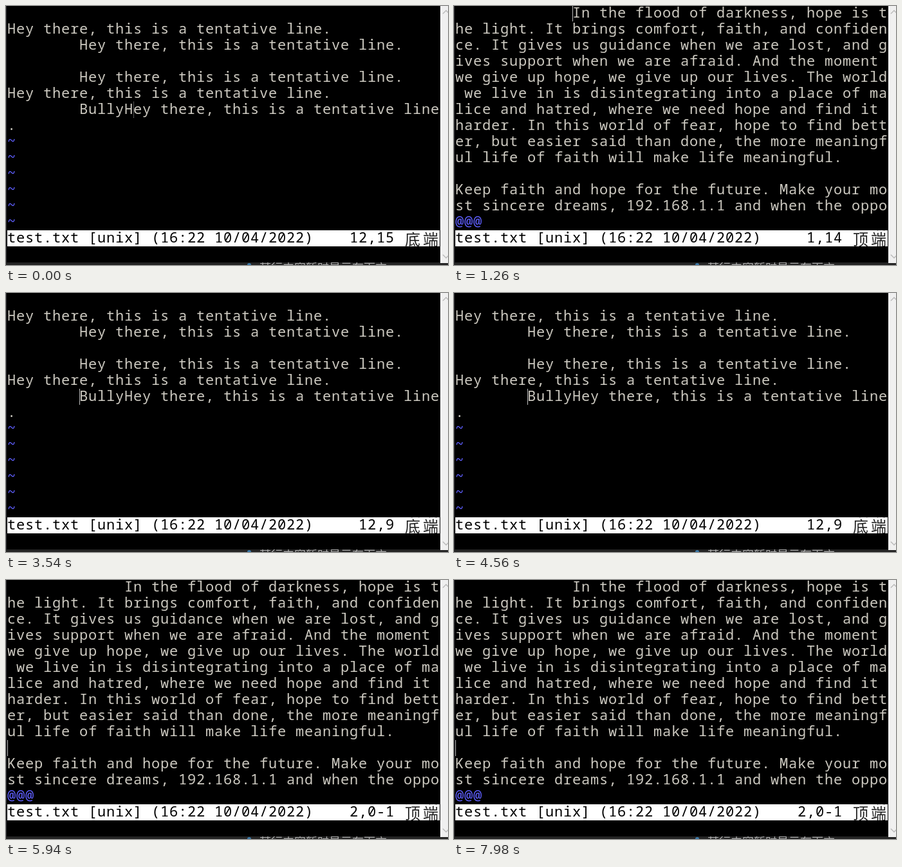
Recreate the animation shown at these times as an HTML page. Size 687 px wide and 403 px high, loop 8 s.

```html
<!DOCTYPE html>
<html lang="en">
<head>
<meta charset="utf-8">
<title>Terminal editor</title>
<style>
  html, body { margin: 0; width: 100%; height: 100%; overflow: hidden; background: #000; }
  #stage { position: relative; width: 687px; height: 403px; overflow: hidden; background: #000; }
  #stage div, #stage svg, .cjk { position: absolute; }
  #stage div { animation: 8s step-end infinite; }

  pre, .row {
    margin: 0; white-space: pre; color: #ccc9c0;
    font: 500 22px/25px "Noto Sans Mono", "DejaVu Sans Mono", monospace;
    letter-spacing: .8px;
  }
  b { font-weight: 500; color: #5f5fff; }
  #stage .page { left: 2px; top: -3px; }
  #stage .list { animation-name: list; }
  #stage .prose { animation-name: prose; }

  .status { left: 2px; top: 349px; width: 672px; height: 25px; overflow: hidden; background: #fff; }
  .status .row { color: #000; left: 0; top: -2px; }
  #stage .spots { left: 0; top: 0; width: 672px; animation-name: spots; }
  .spots pre { position: relative; top: -2px; height: 25px; }
  .cjk { left: 618px; top: 2px; color: #222; font: 300 24px/25px "Noto Sans CJK SC", "Noto Sans CJK", sans-serif; letter-spacing: 4px; }

  .key { left: 520px; top: 372px; }
  #stage .g { animation-name: g; }
  #stage .two { animation-name: two; }

  #stage .cursor { width: 1px; height: 25px; background: #bfbfbf; animation-name: blink; }

  .edge { left: 0; top: 0; width: 1px; height: 403px; background: #2c2c30; }
  .below { left: 0; top: 399px; width: 687px; height: 4px; overflow: hidden; background: #242424; }
  .below span { position: absolute; left: 394px; top: -2px; white-space: nowrap; color: #aaa;
    font: 18px/18px "Noto Sans CJK SC", "Noto Sans CJK", sans-serif; }
  .dot { left: 375px; top: 1px; width: 6px; height: 6px; border-radius: 50%; background: #3a78a8; }
  .bar { left: 675px; top: 0; width: 12px; height: 400px; background: #f0f0f0; }

  @keyframes list {
    0%, 44.25% { opacity: 1 }
    15.75%, 74.25%, 100% { opacity: 0 }
  }
  @keyframes prose {
    0%, 44.25% { opacity: 0 }
    15.75%, 74.25%, 100% { opacity: 1 }
  }
  @keyframes spots {
    0% { top: 0 }
    15.75% { top: -25px }
    44.25% { top: -50px }
    74.25%, 100% { top: -75px }
  }
  @keyframes g {
    0%, 15.75%, 100% { opacity: 0 }
    13.5% { opacity: 1 }
  }
  @keyframes two {
    0%, 74.25%, 100% { opacity: 0 }
    69.75% { opacity: 1 }
  }
  @keyframes blink {
    0% { left: 198px; top: 149px; opacity: 1; background: repeating-linear-gradient(#a8a8a8 0 1px, #000 1px 2px) }
    2.25% { left: 198px; top: 149px; opacity: 1; background: #bfbfbf }
    8.25% { opacity: 0 }
    13.5% { opacity: 1 }
    15.75% { left: 184px; top: -1px; opacity: 1 }
    21.75% { opacity: 0 }
    28.5% { opacity: 1 }
    34.5% { opacity: 0 }
    41.25% { opacity: 1 }
    44.25% { left: 114px; top: 149px; opacity: 1 }
    50.25% { opacity: 0 }
    57% { opacity: 1 }
    63% { opacity: 0 }
    69.75% { opacity: 1 }
    74.25% { left: 2px; top: 249px; opacity: 1 }
    80.25% { opacity: 0 }
    87% { opacity: 1 }
    93% { opacity: 0 }
    99.75%, 100% { left: 2px; top: 249px; opacity: 1; background: #bfbfbf }
  }
</style>
</head>
<body>
<div id="stage">
  <div class="page list"><pre><span> </span>
Hey there, this is a tentative line.
        Hey there, this is a tentative line.

        Hey there, this is a tentative line.
Hey there, this is a tentative line.
        BullyHey there, this is a tentative line
.
<b>~
~
~
~
~
~</b></pre></div>
  <div class="page prose"><pre>             In the flood of darkness, hope is t
he light. It brings comfort, faith, and confiden
ce. It gives us guidance when we are lost, and g
ives support when we are afraid. And the moment
we give up hope, we give up our lives. The world
 we live in is disintegrating into a place of ma
lice and hatred, where we need hope and find it
harder. In this world of fear, hope to find bett
er, but easier said than done, the more meaningf
ul life of faith will make life meaningful.

Keep faith and hope for the future. Make your mo
st sincere dreams, 192.168.1.1 and when the oppo
<b>@@@</b></pre></div>

  <div class="status">
    <div class="row">test.txt [unix] (16:22 10/04/2022)</div>
    <div class="spots"><pre class="row">                                      12,15<span class="cjk">底端</span></pre><pre class="row">                                       1,14<span class="cjk">顶端</span></pre><pre class="row">                                       12,9<span class="cjk">底端</span></pre><pre class="row">                                      2,0-1<span class="cjk">顶端</span></pre></div>
  </div>
  <div class="row key g">g</div>
  <div class="row key two">2</div>
  <div class="cursor"></div>

  <div class="edge"></div>
  <div class="below"><div class="dot"></div><span>某行内容暂时显示在下方</span></div>
  <div class="bar">
    <svg width="12" height="400" fill="none" stroke="#b8b8b8" stroke-width="1.4">
      <path d="M4 12l5-5 5 5M4 387l5 5 5-5"/>
    </svg>
  </div>
</div>
</body>
</html>
```
